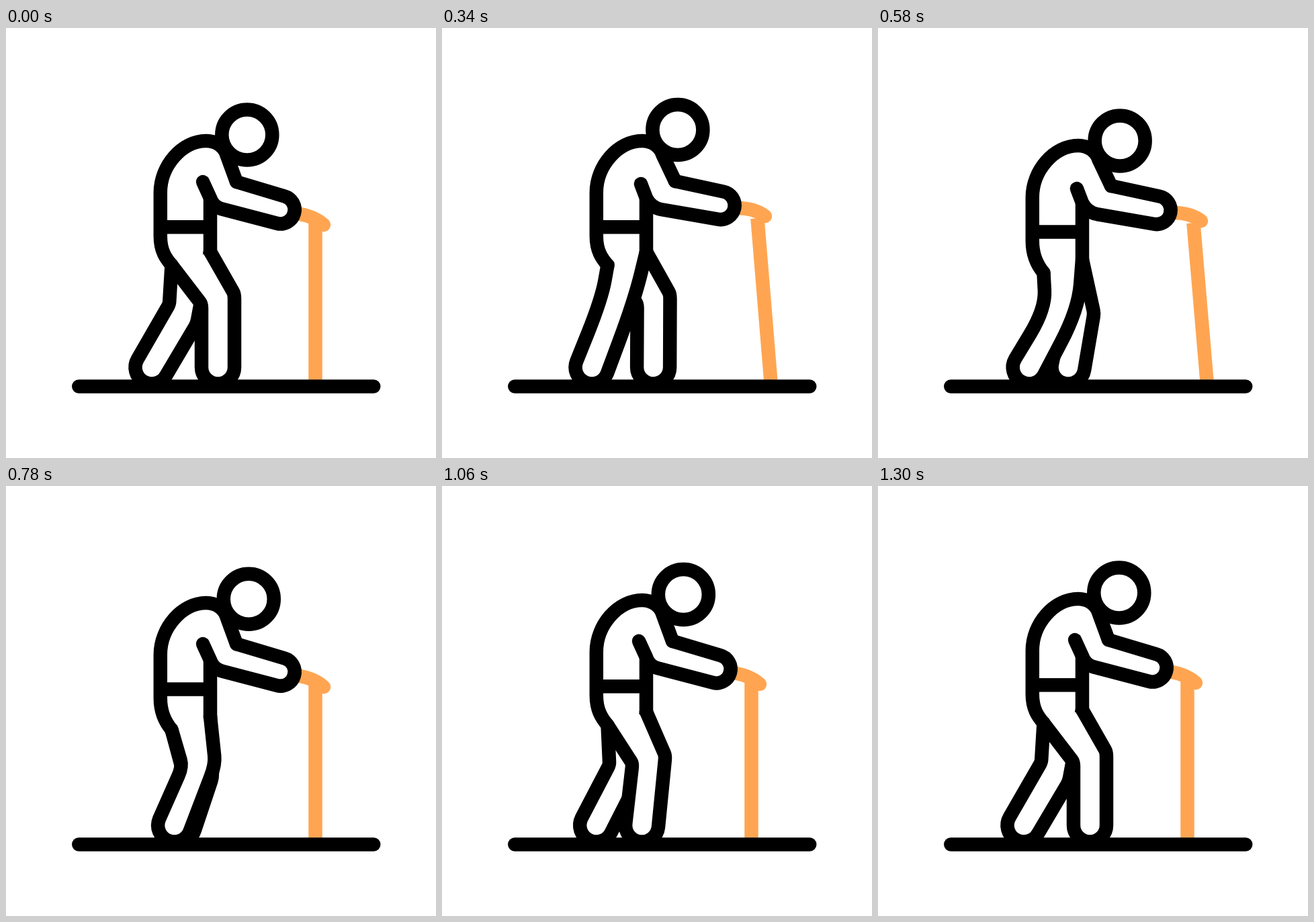
An HTML page with a canvas that plays this animation: 640 px wide and 640 px high, repeating every 1380 ms.

```html
<!DOCTYPE html>
<html>
<head>
<meta charset="utf-8">
<style>
  html, body { margin: 0; width: 100%; height: 100%; overflow: hidden; background: #fff; }
  canvas { display: block; }
</style>
</head>
<body>
<canvas id="stage" width="640" height="640"></canvas>
<script>
const ctx = document.getElementById('stage').getContext('2d');
const LOOP = 1380, WALK = 1300, STEP = 20;
const BLACK = '#000', ORANGE = '#ffa552', WIDTH = 20.5, RAD = Math.PI / 180;

// Leg pose: back knee x,y, front knee x,y, foot x, shin angle
const FRONT = [291, 411, 340, 396, 315.5, 0];
const NEAR_BACK = [236, 403, 285, 405, 220.5, 23];
const FAR_BACK = [243, 411, 284, 440, 217, 30.6];

const mix = (a, b, k) => a.map((v, i) => v + (b[i] - v) * k);

function ease(t, from, to) {
  const s = Math.min(1, Math.max(0, (t - from) / (to - from)));
  return (1 - Math.cos(Math.PI * s)) / 2;
}

const pulse = (t, a, b, c, d) => ease(t, a, b) * (1 - ease(t, c, d));

function stroke(trace, color = BLACK, cap = 'round') {
  ctx.strokeStyle = color;
  ctx.lineCap = cap;
  ctx.beginPath();
  trace();
  ctx.stroke();
}

function bend(from, knee, to, soft) {
  ctx.lineTo(...mix(knee, from, soft));
  ctx.quadraticCurveTo(...knee, ...mix(knee, to, soft));
  ctx.lineTo(...to);
}

function leg(pose, drop, flex, soft) {
  const [backX, backY, frontX, frontY, footX, angle] = pose;
  const a = (angle + 0.75 * flex) * RAD, r = 24.5, footY = 505;
  const dx = r * Math.cos(a), dy = r * Math.sin(a);
  const hipBack = [246.5, 353 + 1.6 * drop], hipFront = [304, 333 + 1.6 * drop];
  stroke(() => {
    ctx.moveTo(...hipBack);
    bend(hipBack, [backX + flex, backY + 2 * drop], [footX - dx, footY - dy], soft);
    ctx.arc(footX, footY, r, Math.PI + a, a, true);
    bend([footX + dx, footY + dy], [frontX + flex, frontY + 2 * drop], hipFront, soft);
    ctx.fill();
  });
}

function cane(drop, u) {
  stroke(() => {
    ctx.moveTo(460.5 + 9 * u, 290 - 7 * u + drop);
    ctx.lineTo(460.5 + 29 * u, 524);
  }, ORANGE, 'butt');
  stroke(() => {
    ctx.moveTo(428 + 8 * u, 276 - 8 * u + drop);
    ctx.quadraticCurveTo(456 + 8 * u, 278 - 11 * u + drop, 473 + 8 * u, 293 - 13 * u + drop);
  }, ORANGE);
}

function torso(drop, u) {
  const stretch = 0.6 * drop;
  stroke(() => {
    ctx.moveTo(343 + 4 * u, 229 - u);
    ctx.lineTo(328, 188);
    ctx.bezierCurveTo(324, 176, 312, 168, 298, 168);
    ctx.bezierCurveTo(262, 168, 229.8, 205, 229.8, 245);
    ctx.lineTo(229.8, 310);
    ctx.bezierCurveTo(229.8, 332, 238, 343 + stretch, 246.5, 353 + stretch);
    ctx.moveTo(229.8, 296.3);
    ctx.lineTo(304, 296.3);
    ctx.moveTo(304, 254);
    ctx.lineTo(304, 333 + stretch);
  });
}

function arm(u) {
  const a = (15.5 - 4.5 * u) * RAD;
  stroke(() => {
    ctx.moveTo(293 + 3 * u, 229 + 3 * u);
    ctx.lineTo(304, 253);
    ctx.quadraticCurveTo(308 + 3 * u, 265 + 2 * u, 320 + 6 * u, 269 + u);
    ctx.arc(408.7 + 6 * u, 270.5 - 6.5 * u, 21, a + Math.PI / 2, a - Math.PI / 2, true);
    ctx.lineTo(343 + 4 * u, 229 - u);
  });
}

function draw(t) {
  const drop = 7.2 * pulse(t, 360, 600, 600, WALK);
  const swing = pulse(t, 40, 360, 570, 780);
  const lift = pulse(t, 40, 360, 360, 600);
  const nod = pulse(t, 380, 740, 740, 1200);
  const nearBack = pulse(t, 0, 380, 460, WALK);
  const farFront = t < 360 ? ease(t, 30, 360) : ((WALK - t) / (WALK - 360)) ** 1.5;

  ctx.fillStyle = '#fff';
  ctx.fillRect(0, 0, 640, 640);
  cane(drop, swing);
  stroke(() => {
    ctx.moveTo(108.3, 533.5);
    ctx.lineTo(547.2, 533.5);
  });
  leg(mix(FAR_BACK, FRONT, farFront), drop, 0, 0.06);
  leg(mix(FRONT, NEAR_BACK, nearBack), drop, 1.5 * drop, 0.06 + 0.55 * nearBack ** 4);
  ctx.save();
  ctx.translate(0, drop);
  torso(drop, swing);
  arm(swing);
  stroke(() => ctx.arc(358.8 - 8 * lift + 2.5 * nod, 159 - 7.5 * lift + 3.3 * nod, 37.5, 0, 2 * Math.PI));
  ctx.restore();
}

ctx.lineJoin = 'round';
ctx.lineWidth = WIDTH;
const start = performance.now();
function tick() {
  const t = (performance.now() - start) % LOOP;
  draw(Math.min(WALK, Math.floor(t / STEP) * STEP));
  requestAnimationFrame(tick);
}
tick();
</script>
</body>
</html>
```
